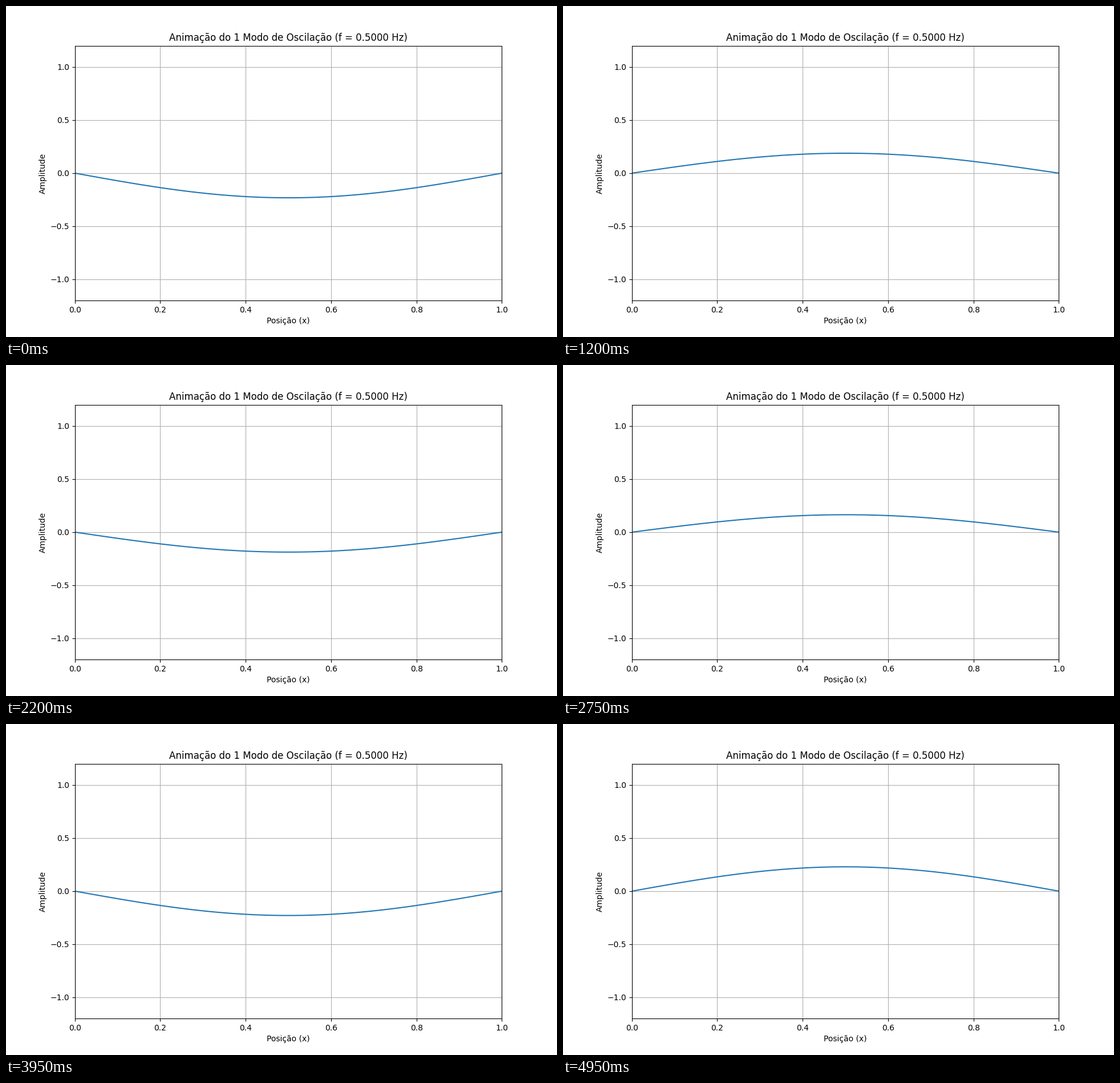
Recreate the animation shown at these times as a matplotlib script. Size 966 px wide and 580 px high, loop 5000 ms.

```python
import numpy as np
import matplotlib.pyplot as plt
from matplotlib.animation import FuncAnimation

FREQ = 0.5          # Hz
PEAK = 0.232
INTERVAL = 50       # ms
FRAMES = 100

plt.rcParams["font.family"] = "DejaVu Sans"

fig, ax = plt.subplots(figsize=(9.66, 5.8), dpi=100)
ax.set_xlim(0, 1)
ax.set_ylim(-1.2, 1.2)
ax.set_xlabel("Posição (x)")
ax.set_ylabel("Amplitude")
ax.set_title(f"Animação do 1 Modo de Oscilação (f = {FREQ:.4f} Hz)")
ax.grid(True)

x = np.linspace(0, 1, 100)
mode = -PEAK * np.sin(np.pi * x)
line, = ax.plot(x, mode)


def update(frame):
    t = frame * INTERVAL / 1000
    line.set_ydata(mode * np.cos(2 * np.pi * FREQ * t))
    return line,


anim = FuncAnimation(fig, update, frames=FRAMES, interval=INTERVAL,
                     repeat=True, repeat_delay=0)
plt.show()
```
